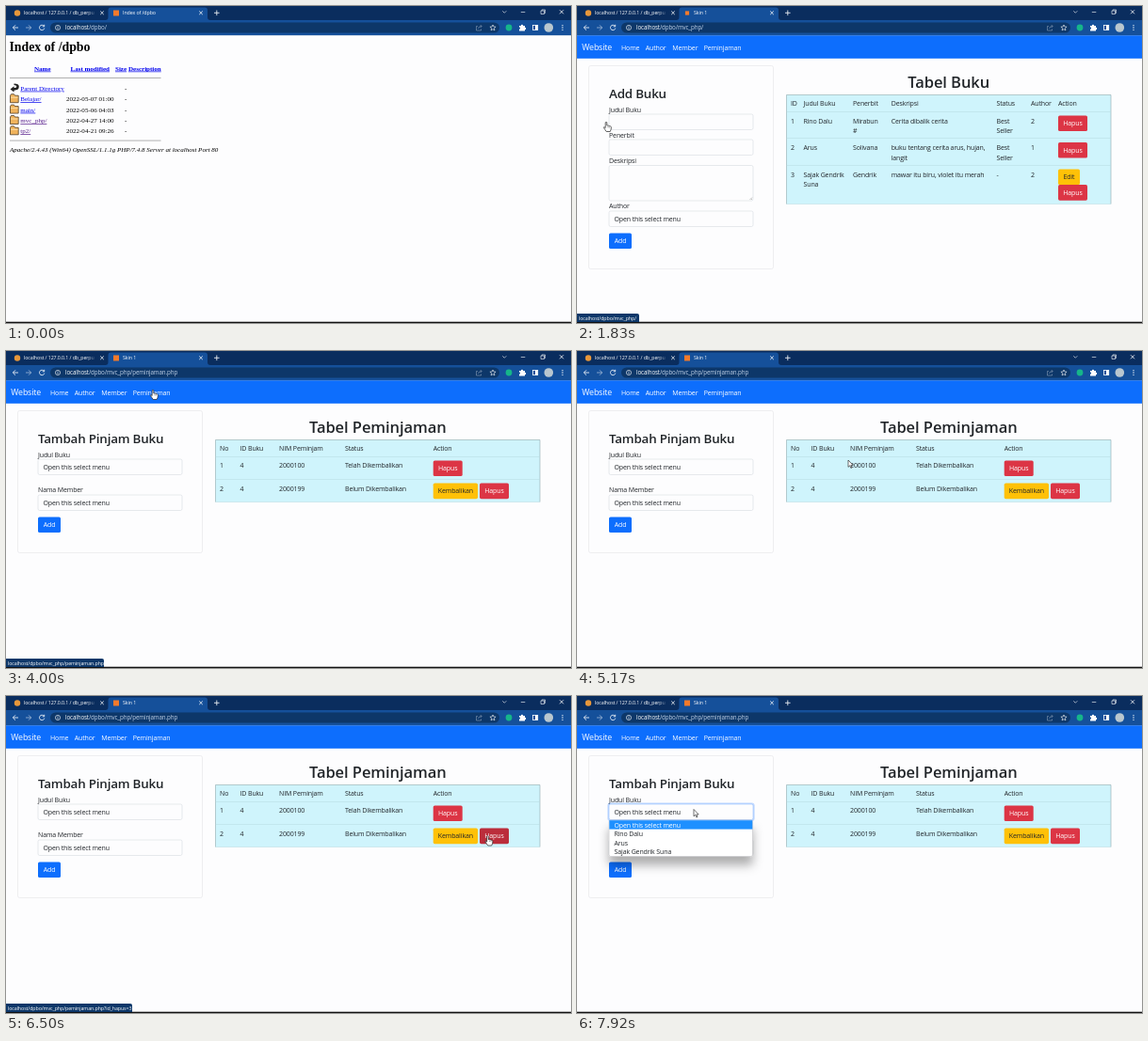
These frames come from a looping animation (600 px wide and 337 px high, 8 s). An HTML page:

```html
<!DOCTYPE html>
<html lang="id">
<head>
<meta charset="utf-8">
<title>Skin 1</title>
<style>
html, body { margin: 0; width: 100%; height: 100%; overflow: hidden; background: #fdfdfe; }
svg { display: block; width: 100vw; height: 100vh; }
text { font: 7px "Open Sans", "Noto Sans", sans-serif; letter-spacing: -.018em; fill: #212529; white-space: pre; }
.ui { font-size: 5.3px; fill: #fff; }
.url { font-size: 6.2px; fill: #fff; }
.dim { fill: #c3d4ea; }
.brand { font-size: 8.8px; fill: #fff; }
.white { fill: #fff; }
.h2 { font-size: 13.4px; font-weight: 600; letter-spacing: -.015em; }
.h1 { font-size: 16.5px; font-weight: 600; letter-spacing: -.004em; text-anchor: middle; }
.mid { text-anchor: middle; }
.se { font: 7.03px "Liberation Serif", serif; letter-spacing: 0; fill: #000; }
.link { fill: #00e; text-decoration: underline; }
.seen { fill: #551a8b; }
.bold { font-weight: bold; }
.big { font-size: 13.8px; font-weight: bold; }
.it { font-style: italic; }
.line { fill: none; stroke: #fff; stroke-width: .8; }
</style>
</head>
<body>
<svg id="stage" viewBox="0 0 600 337" preserveAspectRatio="none"></svg>
<script>
const TICK = 1000 / 12, LOOP = 96;
const NAVY = '#0a2d5e', BAR = '#15509a', RED = '#dc3545', AMBER = '#ffc107', BLUE = '#0d6efd', PAPER = '#fdfdfe';

const text = (x, y, s, cls = '') => `<text x="${x}" y="${y}" class="${cls}">${s}</text>`;
const rect = (x, y, w, h, fill, more = '') =>
  `<rect x="${x}" y="${y}" width="${w}" height="${h}" fill="${fill}" ${more}/>`;
const path = (d, more = 'class="line"') => `<path d="${d}" ${more}/>`;
const dot = (x, y, r, fill, more = '') => `<circle cx="${x}" cy="${y}" r="${r}" fill="${fill}" ${more}/>`;
const group = (id, body) => `<g id="${id}">${body}</g>`;

const cross = (x, y, r) => path(`M${x - r} ${y - r}l${2 * r} ${2 * r}m0 ${-2 * r}l${-2 * r} ${2 * r}`);
const button = (x, y, w, label, fill, id = '') =>
  rect(x, y, w, 16.7, fill, `rx="1.7" ${id && `id="${id}"`}`) +
  text(x + w / 2, y + 10.8, label, 'mid' + (fill === AMBER ? '' : ' white'));
const field = (y, h = 16.5, label = '', id = '') =>
  rect(34, y, 153, h, PAPER, `rx="1.7" stroke="#ced4da" stroke-width=".5" ${id && `id="${id}"`}`) +
  text(39.5, y + 10.8, label);
const row = (y, cols, cells) => cells.map((cell, i) =>
  cell.split('|').map((s, n) => text(cols[i], y + n * 10.7, s)).join('')).join('');
const rule = y => rect(222.5, y, 344.5, .5, '#b4d8df');
const table = bottom => rect(222.5, 94.5, 344.5, bottom - 94.5, '#cff4fc') +
  path(`M222.500 ${bottom}V94.500H567V${bottom}`, 'fill="none" stroke="#8fa9ae" stroke-width=".6"') + rule(bottom);
const card = bottom => rect(12.5, 63.5, 196, bottom - 63.5, PAPER, 'rx="2" stroke="#dfdfe2" stroke-width=".5"');

function browser() {
  return rect(0, 0, 600, 15.5, NAVY) + rect(0, 15, 600, 16.2, BAR) +
    path('M105.500 15q3 0 3-3V4.500q0-3 3-3H211q3 0 3 3V12q0 3 3 3z', `fill="${BAR}"`) +
    dot(12, 7.5, 3.2, '#e8973a') +
    text(19, 9.3, 'localhost / 127.0.0.1 / db_perpu', 'ui') +
    rect(86, 2, 11, 11, 'url(#fade)') + cross(102, 7.3, 1.8) +
    rect(114, 4.5, 6, 6, '#f37a2b', 'id="favicon"') +
    `<text id="tab" x="124" y="9.3" class="ui"></text>` + cross(207, 7.3, 1.8) +
    path('M221 7.300h5.600M223.800 4.500v5.600') +
    path('M527.300 5.300l2 2 2-2M546.800 6.500h4.500M568 5h3.500v3.500H568zM569 4.800v-.8h3.500v3.500h-.8', 'class="line" style="stroke-width:.6"') +
    cross(590, 6.3, 2) +
    path('M13 23H7.500m2.500-2.700L7.300 23l2.700 2.700') +
    path('M21 23h5.500m-2.500-2.700l2.700 2.700-2.700 2.700', 'class="line" opacity=".6"') +
    path('M40.300 21.300a2.700 2.700 0 1 0 .5 2.300M40.700 19.800v2h-2') +
    rect(47, 17.4, 477, 11.2, '#0d3769', 'rx="5.6"') +
    dot(55, 23, 2.6, 'none', 'class="line" style="stroke-width:.6"') + path('M55 22.600v1.800M55 21.300v.6') +
    `<text x="63" y="25.2" class="url">localhost<tspan id="url" class="dim"></tspan></text>` +
    path('M501 21.500h-1.500v4.500h5V24.500M501.500 24q.3-2.500 3.500-2.500m-1.300-1.500l1.500 1.500-1.500 1.500', 'class="line" opacity=".5" style="stroke-width:.6"') +
    path('M517 20l.9 2 2.200.2-1.700 1.500.5 2.200-1.900-1.200-1.900 1.200.5-2.200-1.700-1.500 2.200-.2z', 'class="line" style="stroke-width:.6"') +
    dot(534, 23, 3.4, '#16b58a') +
    path('M545 21h1.800a1.200 1.200 0 0 1 2.400 0h1.800v1.800a1.200 1.200 0 0 1 0 2.400v1.300h-6v-1.800a1.100 1.100 0 0 0 0-2.200z', 'fill="#fff"') +
    rect(559.5, 20.5, 5.2, 5, 'none', 'class="line"') + rect(562, 20.5, 2.7, 5, '#fff') +
    dot(576.3, 23, 4.8, '#b9c7cf') +
    [20.7, 23, 25.3].map(y => dot(591, y, .65, '#fff')).join('') +
    rect(0, 335.7, 600, 1.3, '#111');
}

function listing() {
  const folder = y =>
    path(`M4.500 ${y - 6}l1-1.500h3l1 1.500h3.700v7.500H4.500z`, 'fill="#f0b35c" stroke="#3b2a16" stroke-width=".7"') +
    path(`M5 ${y - 4}h7.500`, 'stroke="#ffe2ad" stroke-width=".9"');
  const entry = (y, name, date, seen) => folder(y) +
    text(15.3, y, name, 'se link' + (seen ? ' seen' : '')) + text(64, y, date, 'se') + text(126, y, '-', 'se');
  const head = (x, s) => text(x, 68.5, s, 'se link bold');
  const hr = y => rect(4, y, 160.5, .7, '#8f8f8f');
  return text(3.5, 47.5, 'Index of /dpbo', 'se big') +
    head(30, 'Name') + head(68.5, 'Last modified') + head(116, 'Size') + head(130, 'Description') + hr(76) +
    path('M4.500 88.500l4-3.300v1.700q2.800.2 2.800-1.500 0-1.300-2.800-1.500v-1.400q5.300 0 5.300 3.300 0 3.800-5.300 3.900v1.900z', 'fill="#222"') +
    text(15.3, 89.6, 'Parent Directory', 'se link') + text(126, 89.6, '-', 'se') +
    entry(101.2, 'Belajar/', '2022-05-07 01:00') + entry(112.6, 'main/', '2022-05-06 04:03') +
    entry(124, 'mvc_php/', '2022-04-27 14:00', true) + entry(135.3, 'tp2/', '2022-04-21 09:26', true) + hr(142.7) +
    text(4, 155, 'Apache/2.4.43 (Win64) OpenSSL/1.1.1g PHP/7.4.8 Server at localhost Port 80', 'se it');
}

const navbar = () => rect(0, 31.2, 600, 24.6, BLUE) + text(5.3, 47, 'Website', 'brand') +
  [[47, 'Home'], [72.7, 'Author'], [101.3, 'Member'], [134.7, 'Peminjaman']]
    .map(([x, s]) => text(x, 46.5, s, 'white')).join('');

function books() {
  const cols = [227, 240.5, 293, 333.7, 445.5, 482, 511];
  return card(279.5) + text(34, 98.3, 'Add Buku', 'h2') +
    text(34, 112.6, 'Judul Buku') + field(115) + text(34, 139.8, 'Penerbit') + field(142) +
    text(34, 167, 'Deskripsi') + field(169.5, 37.5) +
    path('M183.500 206l2.500-2.500m-1 2.500l1-1', 'stroke="#888" stroke-width=".5"') +
    text(34, 215.2, 'Author') + field(218, 16.5, 'Open this select menu') + button(34, 241.4, 24, 'Add', BLUE) +
    text(394.7, 87.2, 'Tabel Buku', 'h1') + table(210.5) + rule(112) + rule(140.5) + rule(169) +
    row(106.3, cols, ['ID', 'Judul Buku', 'Penerbit', 'Deskripsi', 'Status', 'Author', 'Action']) +
    row(124.6, cols, ['1', 'Rino Dalu', 'Mirabun|#', 'Cerita dibalik cerita', 'Best|Seller', '2']) +
    row(152.9, cols, ['2', 'Arus', 'Solivana', 'buku tentang cerita arus, hujan,|langit', 'Best|Seller', '1']) +
    row(181.5, cols, ['3', 'Sajak Gendrik|Suna', 'Gendrik', 'mawar itu biru, violet itu merah', '-', '2']) +
    button(511, 116.4, 31, 'Hapus', RED) + button(511, 144.9, 31, 'Hapus', RED) +
    button(511, 173.4, 23, 'Edit', AMBER) + button(511, 190.1, 31, 'Hapus', RED);
}

function loans() {
  const cols = [227, 248.5, 290, 360, 453.7];
  return card(214.5) + text(34, 98.3, 'Tambah Pinjam Buku', 'h2') +
    text(34, 112.6, 'Judul Buku') +
    rect(32.4, 113.4, 156.2, 19.7, BLUE, 'id="glow" rx="3"') +
    field(115, 16.5, 'Open this select menu', 'select') +
    text(34, 150.4, 'Nama Member') + field(153, 16.5, 'Open this select menu') + button(34, 176.4, 24, 'Add', BLUE) +
    text(394.8, 87.2, 'Tabel Peminjaman', 'h1') + table(160.5) + rule(112) + rule(136.4) +
    row(106.3, cols, ['No', 'ID Buku', 'NIM Peminjam', 'Status', 'Action']) +
    row(124.4, cols, ['1', '4', '2000100', 'Telah Dikembalikan']) +
    row(148.6, cols, ['2', '4', '2000199', 'Belum Dikembalikan']) +
    button(453.7, 116.4, 31, 'Hapus', RED) +
    button(453.7, 140.5, 47.3, 'Kembalikan', AMBER, 'return') + button(503, 140.5, 31, 'Hapus', RED, 'remove');
}

const menu = () =>
  rect(34, 132, 152.5, 38.5, '#fff', 'rx="1.7" stroke="#b5b5b8" stroke-width=".5" filter="url(#shadow)"') +
  rect(34.3, 132.2, 152, 9.4, '#1e90ff') + text(39.5, 139.5, 'Open this select menu', 'white') +
  ['Rino Dalu', 'Arus', 'Sajak Gendrik Suna'].map((s, i) => text(39.5, 149.2 + i * 9.6, s)).join('');

// Both pointers have their hot spot at 0,0
const arrow = path('M0 0v9.200l2.100-1.900 1.500 3.300 1.400-.6-1.500-3.200h3z', 'fill="#fff" stroke="#222" stroke-width=".8" transform="scale(.8)"');
const hand = path('M-.8.800q.8-1 1.600 0v3.200l1.400.1 1.300.4 1.300.5q.6.300.6 1.200 0 2-1.200 4.300h-4q-1.600-2.400-2.900-4.200-.2-1.400 1.900.2z',
  'fill="#fff" stroke="#222" stroke-width=".7"') + path('M2 5v1.500M3.400 5.300v1.400', 'stroke="#222" stroke-width=".4"');

document.getElementById('stage').innerHTML =
  `<defs><linearGradient id="fade"><stop stop-color="${NAVY}" stop-opacity="0"/><stop offset="1" stop-color="${NAVY}"/></linearGradient>
  <filter id="shadow" x="-20%" y="-30%" width="140%" height="220%"><feDropShadow dx="0" dy="9" stdDeviation="5.500" flood-opacity=".32"/></filter></defs>` +
  rect(0, 0, 600, 337, PAPER) + group('listing', listing()) +
  group('site', navbar() + group('books', books()) + group('loans', loans() + group('menu', menu()))) + browser() +
  group('status', path('', 'id="bubble" fill="#0d3769"') + text(2, 333.6, '', 'ui')) +
  group('pointer', group('arrow', arrow) + group('hand', hand));

const $ = id => document.getElementById(id);
const show = (id, on) => $(id).setAttribute('visibility', on ? 'inherit' : 'hidden');
const statusText = document.querySelector('#status text');

// All times below count twelfths of a second
const moves = [[7, 112, 345], [15, 31, 123], [29, 31, 123], [37, 156, 41], [51, 156, 41], [58, 288, 116],
  [67, 288, 116], [75, 484, 150], [77, 497, 149], [78, 511.5, 148.5], [81, 511.5, 148.5], [89, 124, 120.5], [96, 124, 120.5]];
const LOAN = 'localhost/dpbo/mvc_php/peminjaman.php';
const hints = [[0, '', 0], [17, 'localhost/dpbo/mvc_php/', 66], [30, '', 0], [37, LOAN, 104], [53, '', 0],
  [76, LOAN + '?id_edit=3', 130], [78, LOAN + '?id_hapus=3', 134], [83, '', 0]];
const within = (n, a, b) => n >= a && n < b;

function pointerAt(n) {
  const i = moves.findIndex(m => m[0] >= n);
  if (i < 1) return moves[0].slice(1);
  const [a, ax, ay] = moves[i - 1], [b, bx, by] = moves[i];
  const u = (n - a) / (b - a), e = u * u * (3 - 2 * u);
  return [ax + (bx - ax) * e, ay + (by - ay) * e];
}

function draw(n) {
  const page = n < 20 ? 0 : n < 42 ? 1 : 2;
  show('listing', page === 0);
  show('site', page > 0);
  show('books', page === 1);
  show('loans', page === 2);
  $('tab').textContent = page ? 'Skin 1' : 'Index of /dpbo';
  $('url').textContent = ['/dpbo/', '/dpbo/mvc_php/', '/dpbo/mvc_php/peminjaman.php'][page];
  const loading = within(n, 19, 25) || within(n, 41, 45);
  $('favicon').setAttribute('transform', loading ? 'translate(35.1 2.25) scale(.7)' : '');

  const [, hint, width] = hints.filter(h => h[0] <= n).pop();
  show('status', hint);
  statusText.textContent = hint;
  $('bubble').setAttribute('d', `M0 327H${Math.max(0, width - 2)}q2 0 2 2V336H0z`);

  const focus = Math.max(0, Math.min(1, (n - 91) / 2));
  $('glow').setAttribute('opacity', focus * .25);
  $('select').setAttribute('stroke', focus ? '#86b7fe' : '#ced4da');
  show('menu', page === 2 && n >= 93);

  const [x, y] = pointerAt(n);
  const over = (l, r) => page === 2 && within(x, l, r) && within(y, 140, 157.5);
  const onReturn = over(453.7, 501), onRemove = over(503, 534);
  $('return').setAttribute('fill', onReturn ? '#ffca2c' : AMBER);
  $('remove').setAttribute('fill', onRemove ? '#bb2d3b' : RED);
  const pointing = within(n, 14, 30) || within(n, 36, 52) || onReturn || onRemove;
  show('hand', pointing);
  show('arrow', !pointing);
  $('pointer').setAttribute('transform', `translate(${x.toFixed(2)} ${y.toFixed(2)})`);
}

const start = performance.now();
function frame() {
  draw(Math.floor((performance.now() - start) / TICK + .1) % LOOP);
  requestAnimationFrame(frame);
}
frame();
</script>
</body>
</html>
```
